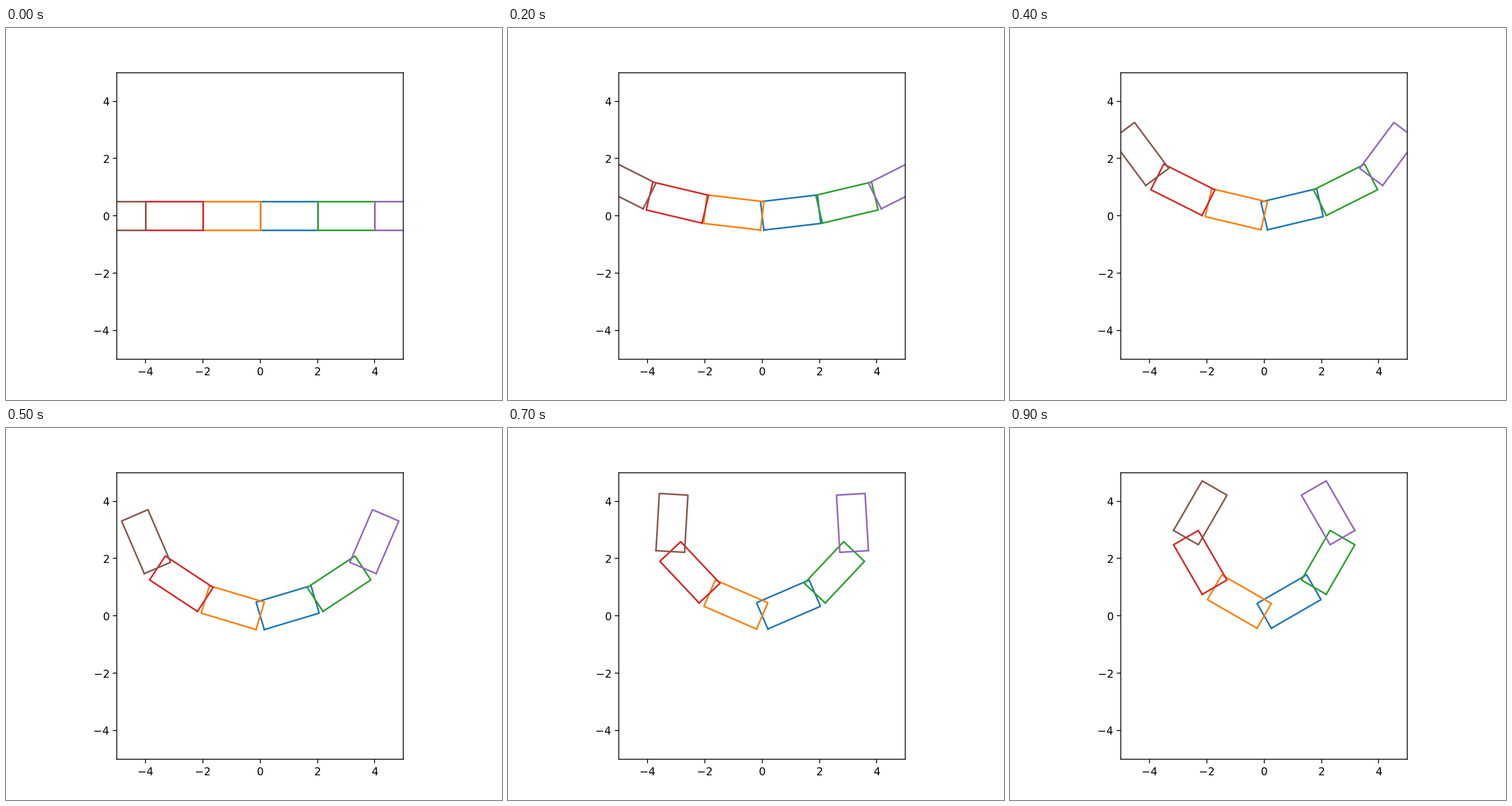
Write a matplotlib script that moves like this. It is 864x648 px and loops after 1 s.

```python
import numpy as np
import matplotlib.pyplot as plt
from matplotlib.animation import FuncAnimation

FRAMES = 10
LENGTH, WIDTH = 2, 1
MAX_ANGLE = np.radians(30)
ANGLE_FACTORS = (1, 2, 4)  # each link bends twice as far as the one before

# Closed outline of a link whose pivot is the middle of its left side
LINK = np.array([
    [0, LENGTH, LENGTH, 0, 0],
    [-WIDTH / 2, -WIDTH / 2, WIDTH / 2, WIDTH / 2, -WIDTH / 2],
])

fig, ax = plt.subplots(figsize=(6.4, 4.8), dpi=135)
ax.set_aspect("equal")
ax.set_xlim(-5, 5)
ax.set_ylim(-5, 5)
ax.set_xticks(range(-4, 5, 2))
ax.set_yticks(range(-4, 5, 2))

# Right and left links alternate, so the colour cycle runs outwards in pairs
pairs = [[ax.plot([], [], lw=1.5)[0] for _ in range(2)] for _ in ANGLE_FACTORS]


def update(frame):
    bend = MAX_ANGLE * frame / (FRAMES - 1)
    pivot = np.zeros(2)
    for (right, left), factor in zip(pairs, ANGLE_FACTORS):
        c, s = np.cos(factor * bend), np.sin(factor * bend)
        x, y = np.array([[c, -s], [s, c]]) @ LINK + pivot[:, None]
        right.set_data(x, y)
        left.set_data(-x, y)
        pivot = pivot + LENGTH * np.array([c, s])
    return [line for pair in pairs for line in pair]


anim = FuncAnimation(fig, update, frames=FRAMES, interval=100, repeat=True)
plt.show()
```
